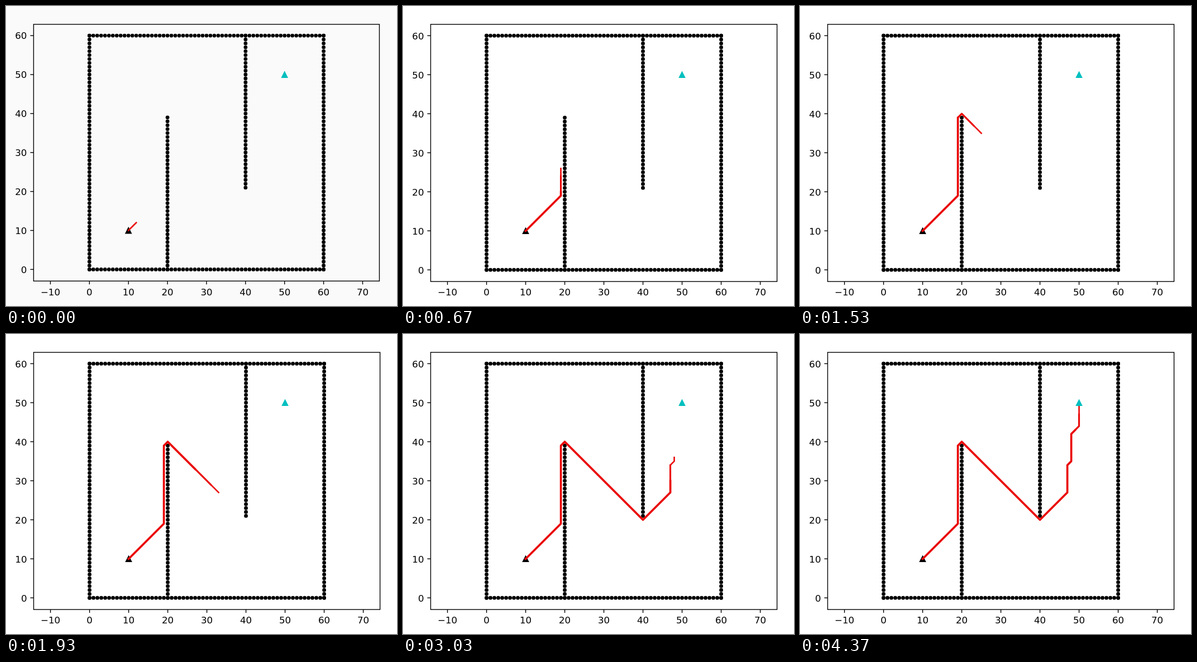
An HTML page for the animation above (4.56 s loop, 700x538 px).

```html
<!DOCTYPE html>
<html lang="en">
<head>
<meta charset="utf-8">
<title>Path through walls</title>
<style>
html, body { margin: 0; width: 100%; height: 100%; overflow: hidden; background: #fff; }
svg { display: block; width: 100vw; height: 100vh; }
text { font: 16.7px "DejaVu Sans", sans-serif; }
</style>
</head>
<body>
<svg id="stage" viewBox="0 0 700 538">
  <rect id="paper" width="700" height="538" fill="#fff"/>
  <g id="plot">
    <g id="axes" fill="none" stroke="#000" stroke-width="1.4">
      <rect x="49.5" y="32.9" width="620.1" height="461.2"/>
    </g>
    <g id="labels"></g>
    <g id="walls"></g>
    <path id="start" stroke="#000" stroke-width="1.4"/>
    <path id="goal" fill="#00bfbf" stroke="#00bfbf" stroke-width="1.4"/>
    <g fill="none" stroke="#ea0808" stroke-linecap="square" stroke-linejoin="round">
      <polyline id="fresh" stroke-width="2.6"/>
      <polyline id="drying" stroke-width="3.1"/>
      <polyline id="settled" stroke-width="3.6"/>
    </g>
  </g>
</svg>
<script>
const LOOP = 4560;
const SETTLE = 200;
const RATE = 0.02102;
const FIRST = 2.87;
const $ = id => document.getElementById(id);
const px = x => 149.6 + 7 * x;
const py = y => 473.2 - 7 * y;

function add(parent, tag, attrs, text) {
  const el = document.createElementNS("http://www.w3.org/2000/svg", tag);
  for (const key in attrs) el.setAttribute(key, attrs[key]);
  if (text !== undefined) el.textContent = text;
  $(parent).appendChild(el);
}

function label(value, x, y, anchor) {
  const text = String(value).replace("-", "\u2212");
  add("labels", "text", { x, y, "text-anchor": anchor }, text);
}

for (let v = -10; v <= 70; v += 10) {
  add("axes", "path", { d: `M${px(v)} 494.1v6` });
  label(v, px(v), 519.4, "middle");
}
for (let v = 0; v <= 60; v += 10) {
  add("axes", "path", { d: `M49.5 ${py(v)}h-6` });
  label(v, 37.5, py(v) + 6.3, "end");
}

function dot(x, y) {
  add("walls", "circle", { cx: px(x), cy: py(y), r: 3.4 });
}
for (let i = 0; i <= 60; i++) {
  dot(i, 0);
  dot(i, 60);
  dot(0, i);
  dot(60, i);
  if (i < 40) {
    dot(20, i);
    dot(40, 60 - i);
  }
}

function triangle(id, x, y) {
  $(id).setAttribute("d", `M${px(x)} ${py(y) - 5.2}l5.2 10.4h-10.4z`);
}
triangle("start", 10, 10);
triangle("goal", 50, 50);

// Unit moves between the corners of the route
const corners = [[10, 10], [19, 19], [19, 39], [20, 40], [40, 20], [47, 27],
  [47, 34], [48, 35], [48, 42], [50, 44], [50, 49]];
const route = [corners[0]];
corners.slice(1).forEach(([x, y], i) => {
  const [fromX, fromY] = corners[i];
  const count = Math.max(Math.abs(x - fromX), Math.abs(y - fromY));
  for (let k = 1; k <= count; k++) {
    route.push([fromX + (x - fromX) * k / count, fromY + (y - fromY) * k / count]);
  }
});

function drawRoute(id, steps) {
  const points = steps > 0 ? route.slice(0, steps + 1) : [];
  $(id).setAttribute("points", points.map(([x, y]) => px(x) + "," + py(y)).join(" "));
}

function render(t) {
  const steps = Math.min(route.length - 1, Math.floor(FIRST + t * RATE));
  // The line thickens behind its tip
  drawRoute("fresh", steps);
  drawRoute("drying", steps - 2);
  drawRoute("settled", steps - 6);

  const rest = 1 - Math.min(1, Math.max(0, t - 30) / (SETTLE - 30));
  const tone = Math.round(255 - 5 * rest);
  $("paper").setAttribute("fill", `rgb(${tone},${tone},${tone})`);
  $("plot").setAttribute("transform", `scale(${1 - 0.0017 * rest})`);
}

let origin;
function tick(now) {
  if (origin === undefined) origin = now;
  render((now - origin) % LOOP);
  requestAnimationFrame(tick);
}
render(0);
requestAnimationFrame(tick);
</script>
</body>
</html>
```
